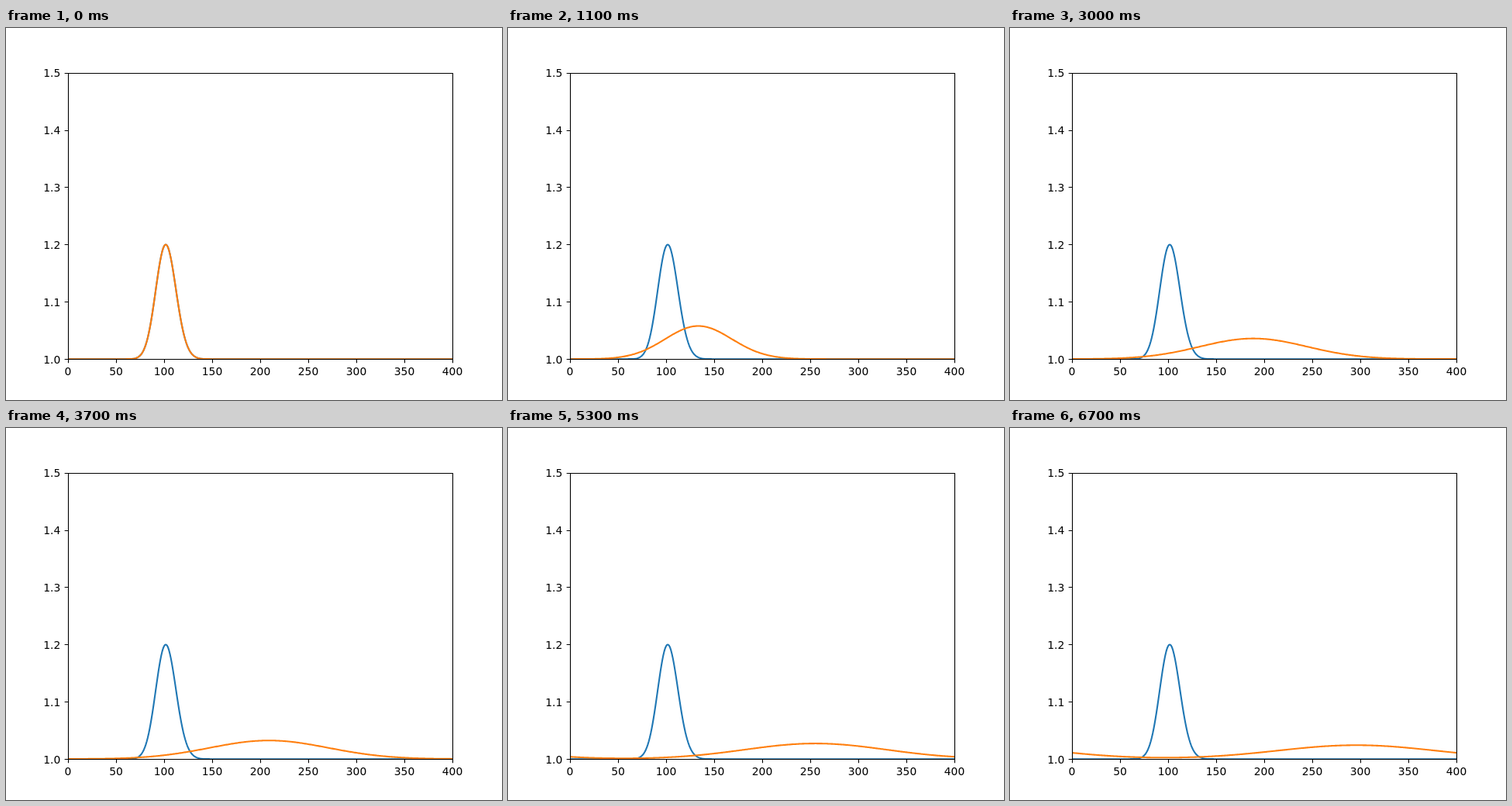
An HTML page with a canvas for the animation above (6.8 s loop, 640 px wide and 480 px high).

```html
<!DOCTYPE html>
<html lang="en">
<head>
<meta charset="utf-8">
<title>Drifting and spreading pulse</title>
<style>
  html, body { margin: 0; width: 100%; height: 100%; overflow: hidden; background: #fff; }
  canvas { display: block; }
</style>
</head>
<body>
<canvas id="stage" width="640" height="480"></canvas>
<script>
const ctx = document.getElementById('stage').getContext('2d');
const LEFT = 80, RIGHT = 576, TOP = 57.6, BOTTOM = 427.2;
const STEP_MS = 100, STEPS = 68, DOMAIN = 400;
const TICK = 4.86;

const px = x => LEFT + x * (RIGHT - LEFT) / DOMAIN;
const py = y => BOTTOM - (y - 1) * (BOTTOM - TOP) / 0.5;
const snap = v => Math.floor(v + 0.5) + 0.5;

// Pulse on a periodic domain; its variance grows linearly and its skew fades.
function density(x, step) {
  const m = step + 1;
  const peak = 101.7 + 2.9 * step;
  const sharp = (0.01 - 0.0009 / (m * m)) / m;
  const skew = 2.5e-5 / (m * m);
  let sum = 0;
  for (let k = -1; k <= 1; k++) {
    const d = x - peak + k * DOMAIN;
    sum += Math.exp(-d * d / 2 * (sharp - skew * Math.min(d, 99)));
  }
  return 1 + 0.2 / Math.sqrt(m) * sum;
}

function curve(step, color) {
  ctx.beginPath();
  for (let x = 0; x <= DOMAIN; x++) ctx.lineTo(px(x), py(density(x, step)));
  ctx.strokeStyle = color;
  ctx.lineWidth = 2.083;
  ctx.lineJoin = 'round';
  ctx.stroke();
}

function axes() {
  const l = snap(LEFT), r = snap(RIGHT), t = snap(TOP), b = snap(BOTTOM);
  ctx.strokeStyle = ctx.fillStyle = '#000';
  ctx.lineWidth = 1.11;
  ctx.lineJoin = 'miter';
  ctx.font = '13.889px "DejaVu Sans", sans-serif';
  ctx.beginPath();
  ctx.rect(l, t, r - l, b - t);

  ctx.textAlign = 'center';
  for (let v = 0; v <= DOMAIN; v += 50) {
    const x = px(v);
    ctx.moveTo(snap(x), b);
    ctx.lineTo(snap(x), b + TICK);
    ctx.fillText(v, x, 448);
  }

  ctx.textAlign = 'right';
  for (let i = 0; i <= 5; i++) {
    const v = 1 + i / 10, y = py(v);
    ctx.moveTo(l, snap(y));
    ctx.lineTo(l - TICK, snap(y));
    ctx.fillText(v.toFixed(1), LEFT - 2 * TICK, Math.round(y + 5.3));
  }
  ctx.stroke();
}

function draw(step) {
  ctx.fillStyle = '#fff';
  ctx.fillRect(0, 0, 640, 480);
  ctx.save();
  ctx.beginPath();
  ctx.rect(80, 58, 497, 370);
  ctx.clip();
  curve(0, '#1f77b4');
  curve(step, '#ff7f0e');
  ctx.restore();
  axes();
}

const start = performance.now();
function tick() {
  draw(Math.floor((performance.now() - start) / STEP_MS) % STEPS);
  requestAnimationFrame(tick);
}
tick();
</script>
</body>
</html>
```
